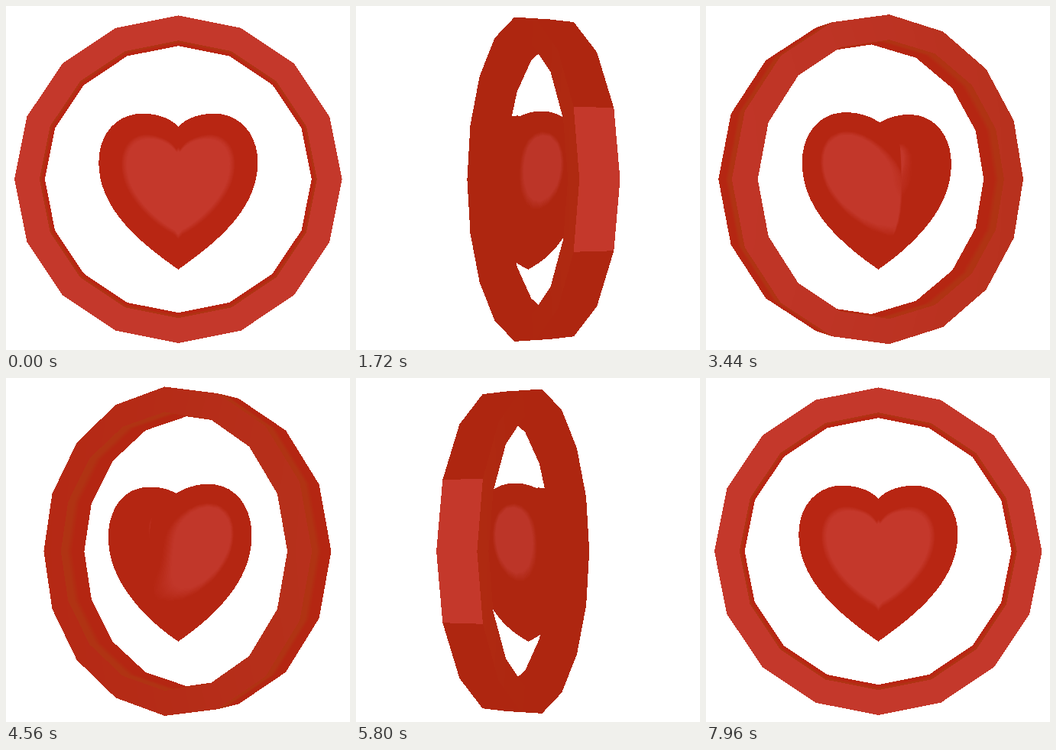
An HTML page with a canvas for the animation above (8000 ms loop, 450 px wide and 450 px high).

```html
<!DOCTYPE html>
<html lang="en">
<head>
<meta charset="utf-8">
<title>Turning heart in a ring</title>
<style>
  html, body { margin: 0; width: 100%; height: 100%; overflow: hidden; background: #fff; }
  canvas { display: block; width: 450px; height: 450px; }
</style>
</head>
<body>
<canvas id="stage" width="450" height="450"></canvas>
<script>
const SIZE = 450, LOOP = 8000, STEP = 40;
const CX = 225.3, CY = 226.7, EYE = 1258;
const ctx = document.getElementById('stage').getContext('2d');
const image = ctx.createImageData(SIZE, SIZE);
const pixels = new Uint32Array(image.data.buffer);
const depth = new Float32Array(SIZE * SIZE);

const clamp = v => Math.max(0, Math.min(1, v));
const ramp = (v, a, b) => clamp((v - a) / (b - a));
const mix = (a, b, k) => a.map((v, i) => v + (b[i] - v) * k);
const dot = (a, b) => a[0] * b[0] + a[1] * b[1] + a[2] * b[2];
const sub = (a, b) => a.map((v, i) => v - b[i]);
const cross = (a, b) => [
  a[1] * b[2] - a[2] * b[1], a[2] * b[0] - a[0] * b[2], a[0] * b[1] - a[1] * b[0]
];
const unit = a => { const l = Math.hypot(...a) || 1; return a.map(v => v / l); };
const cubic = (a, b, c, d, t) => {
  const u = 1 - t;
  return u * u * u * a + 3 * u * u * t * b + 3 * u * t * t * c + t * t * t * d;
};

// Turn: steady at first, faster after the middle, soft stop.
function ease(x) {
  let lo = 0, hi = 1;
  for (let i = 0; i < 30; i++) {
    const m = (lo + hi) / 2;
    if (cubic(0, 0.683, 0.7, 1, m) < x) lo = m; else hi = m;
  }
  return cubic(0, 0.568, 0.96, 1, lo);
}

// Heart: a puffed-up outline, front pole to back pole, thinner towards the tip.
const ROWS = 26, PUFF = 62, TIP = 118;
function heartOutline() {
  const arcs = [
    [[0, -69], [-12, -81], [-29, -86], [-47, -86], 8],
    [[-47, -86], [-80, -86], [-104, -60], [-104, -22], 10],
    [[-104, -22], [-104, 40], [-48, 84], [0, TIP], 18]
  ];
  const half = [];
  for (const [a, b, c, d, n] of arcs)
    for (let i = 0; i < n; i++)
      half.push([0, 1].map(k => cubic(a[k], b[k], c[k], d[k], i / n)));
  const other = half.slice(1).reverse().map(([x, y]) => [-x, y]);
  return [...half, [0, TIP], ...other];
}
function heartPoint(x, y, a) {
  const r = Math.sin(a);
  const puff = PUFF * Math.sqrt(clamp(1 - Math.pow(Math.abs(r), 2.5)));
  const taper = Math.sqrt(clamp(1 - Math.pow(Math.max(0, y * r / TIP), 6)));
  return [x * r, y * r, Math.sign(Math.cos(a)) * puff * taper];
}
const outline = heartOutline(), COLS = outline.length;
const heartRows = Array.from({ length: ROWS + 1 }, (_, j) =>
  outline.map(([x, y]) => heartPoint(x, y, Math.PI * j / ROWS)));
const heartNormals = heartRows.map((row, j) => row.map((p, i) => {
  if (j === 0 || j === ROWS) return [0, 0, j ? -1 : 1];
  const along = sub(row[(i + 1) % COLS], row[(i + COLS - 1) % COLS]);
  const down = sub(heartRows[j + 1][i], heartRows[j - 1][i]);
  const n = unit(cross(along, down));
  return dot(n, p) < 0 ? n.map(v => -v) : n;
}));

// Ring: sixteen straight pieces with a box section.
const SIDES = 16, OUTER = 211, INNER = 178.7, FRONT = 19.2, BACK = -30.2;
const spoke = (i, r, z) => {
  const a = i * 2 * Math.PI / SIDES;
  return [r * Math.cos(a), r * Math.sin(a), z];
};

let cos = 1, sin = 0;
const turn = ([x, y, z]) => [x * cos - z * sin, y, x * sin + z * cos];
const facing = (p, n) => dot(turn(n), unit(sub([0, 0, EYE], turn(p))));

function vertex(p, value) {
  const [x, y, z] = turn(p), k = EYE / (EYE - z);
  return [CX + x * k, CY + y * k, k, value];
}

// Colours for values 0 to 1, packed for the pixel buffer.
const palette = shade => Uint32Array.from({ length: 256 }, (_, i) => {
  const [r, g, b] = shade(i / 255).map(Math.round);
  return 0xff000000 | b << 16 | g << 8 | r;
});

function triangle(a, b, c, colors) {
  const area = (b[0] - a[0]) * (c[1] - a[1]) - (b[1] - a[1]) * (c[0] - a[0]);
  if (Math.abs(area) < 1e-6) return;
  const x0 = Math.max(0, Math.floor(Math.min(a[0], b[0], c[0])));
  const x1 = Math.min(SIZE - 1, Math.ceil(Math.max(a[0], b[0], c[0])));
  const y0 = Math.max(0, Math.floor(Math.min(a[1], b[1], c[1])));
  const y1 = Math.min(SIZE - 1, Math.ceil(Math.max(a[1], b[1], c[1])));
  for (let y = y0; y <= y1; y++) {
    for (let x = x0; x <= x1; x++) {
      const px = x + 0.5, py = y + 0.5;
      const v = ((px - a[0]) * (c[1] - a[1]) - (py - a[1]) * (c[0] - a[0])) / area;
      const w = ((b[0] - a[0]) * (py - a[1]) - (b[1] - a[1]) * (px - a[0])) / area;
      const u = 1 - v - w;
      if (u < -1e-6 || v < -1e-6 || w < -1e-6) continue;
      const near = u * a[2] + v * b[2] + w * c[2], at = y * SIZE + x;
      if (near <= depth[at]) continue;
      depth[at] = near;
      const value = clamp(u * a[3] + v * b[3] + w * c[3]);
      pixels[at] = colors[Math.round(value * 255)];
    }
  }
}

function quad(a, b, c, d, colors) {
  triangle(a, b, c, colors);
  triangle(a, c, d, colors);
}

const LIGHT = [196, 56, 43], BROWN = [176, 51, 19];

function drawHeart(dark, light) {
  const colors = palette(d => mix(dark, light, ramp(d, 0.845, 0.895)));
  const pts = heartRows.map((row, j) =>
    row.map((p, i) => vertex(p, facing(p, heartNormals[j][i]))));
  for (let j = 0; j < ROWS; j++)
    for (let i = 0; i < COLS; i++) {
      const n = (i + 1) % COLS;
      quad(pts[j][i], pts[j][n], pts[j + 1][n], pts[j + 1][i], colors);
    }
}

function drawRing(dark) {
  const flat = Math.abs(cos), tint = ramp(flat, 0.4, 0.75);
  const stops = [[0.35, dark], [0.41, BROWN], [0.5, BROWN], [0.76, dark],
    [0.84, [182, 48, 27]], [0.89, [190, 52, 37]], [0.95, LIGHT]];
  const faceColors = palette(e => {
    let i = 0;
    while (i < stops.length - 2 && e > stops[i + 1][0]) i++;
    const [a, from] = stops[i], [b, to] = stops[i + 1];
    return mix(from, to, ramp(e, a, b));
  });
  const wallColors = lit => palette(w => {
    const edge = ramp(cos < 0 ? 1 - w : w, 0.5, 0.75);
    return mix(mix(dark, BROWN, edge * tint), LIGHT, lit);
  });
  for (let i = 0; i < SIDES; i++) {
    for (const z of [FRONT, BACK]) {
      const n = [0, 0, Math.sign(z)];
      const corner = (k, r) => {
        const p = spoke(k, r, z);
        return vertex(p, 0.6 * flat + 0.4 * facing(p, n));
      };
      quad(corner(i, OUTER), corner(i + 1, OUTER), corner(i + 1, INNER), corner(i, INNER), faceColors);
    }
    for (const r of [OUTER, INNER]) {
      const out = spoke(i + 0.5, 1, 0);
      const lit = r === OUTER ? ramp(facing(spoke(i + 0.5, r, 0), out), 0.82, 0.87) : 0;
      const corner = (k, z) => vertex(spoke(k, r, z), z === FRONT ? 1 : 0);
      quad(corner(i, FRONT), corner(i + 1, FRONT), corner(i + 1, BACK), corner(i, BACK), wallColors(lit));
    }
  }
}

function draw(time) {
  const angle = 2 * Math.PI * ease(time / LOOP);
  cos = Math.cos(angle);
  sin = Math.sin(angle);
  pixels.fill(0xffffffff);
  depth.fill(0);
  const front = Math.pow(ramp(Math.abs(cos), 0.34, 1), 1.5);
  const dark = mix([174, 38, 16], [184, 38, 19], front);
  drawRing(dark);
  drawHeart(dark, mix([188, 53, 40], LIGHT, front));
  ctx.putImageData(image, 0, 0);
}

const start = performance.now();
let shown = -1;
function frame() {
  const elapsed = Math.max(0, performance.now() - start) % LOOP;
  const time = Math.floor(elapsed / STEP) * STEP;
  if (time !== shown) draw(shown = time);
  requestAnimationFrame(frame);
}
frame();
</script>
</body>
</html>
```
